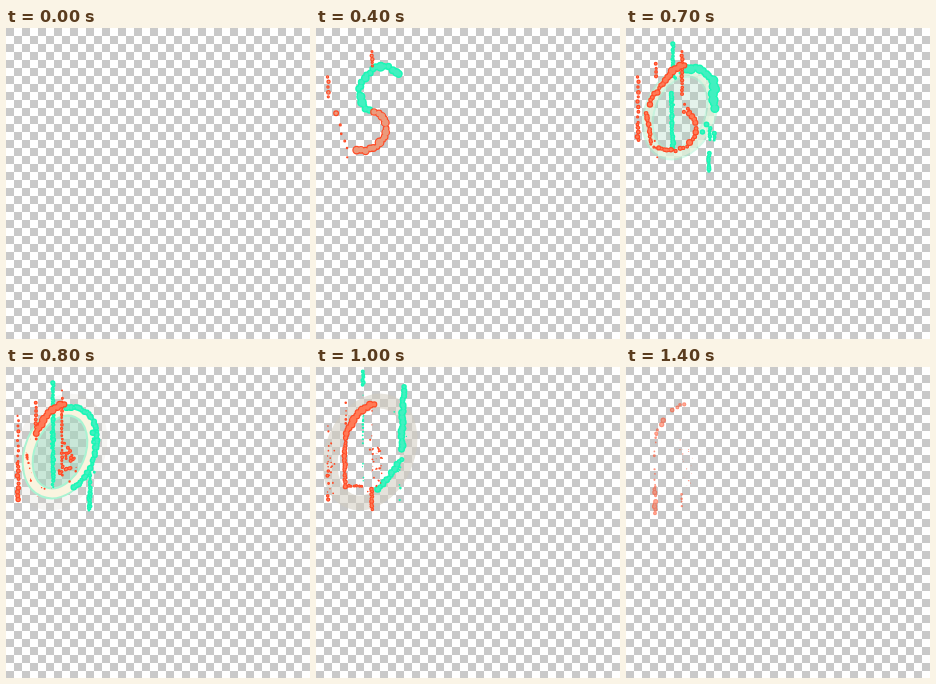
Animation of 304x311 px, one loop 1500 ms. Source, as an HTML page with a canvas:

```html
<!DOCTYPE html>
<html lang="en">
<head>
<meta charset="utf-8">
<title>Liquid ring</title>
<style>
html, body { margin: 0; width: 100%; height: 100%; overflow: hidden; }
body { background: repeating-conic-gradient(#fff 0 25%, #c9c9c9 0 50%) 0 0 / 16px 16px; }
canvas { position: absolute; left: 0; top: 0; }
</style>
</head>
<body>
<script>
const LOOP = 1500, STEP = 100;
const clamp = x => Math.max(0, Math.min(1, x));
const ramp = (t, a, b) => clamp((t - a) / (b - a));

let seed = 7;
const rand = () => {
  seed = (seed * 16807) % 2147483647;
  return seed / 2147483647;
};

function layer() {
  const c = document.createElement('canvas');
  c.width = 304;
  c.height = 311;
  document.body.append(c);
  return c.getContext('2d');
}
const ringLayer = layer(), tealLayer = layer(), redLayer = layer();
const red = [], teal = [];

// A chain of drops that grows along a path from..to and dries up during hold..end.
function drip(list, d, width, [from, to, hold, end], gap = width * .45, spread = width * .12) {
  const path = document.createElementNS('http://www.w3.org/2000/svg', 'path');
  path.setAttribute('d', d);
  const len = path.getTotalLength();
  const n = Math.max(1, Math.round(len / gap));
  for (let i = 0; i <= n; i++) {
    const p = path.getPointAtLength(len * i / n);
    list.push({
      x: p.x + (rand() - .5) * 2 * spread,
      y: p.y + (rand() - .5) * 2 * spread,
      r: width * (.36 + rand() * .2),
      born: from + (to - from) * i / n,
      hold,
      end: hold + (end - hold) * (.35 + .65 * rand())
    });
  }
}

// Opening swirl
drip(red, 'M59 83Q74 92 67 110Q60 124 41 122', 9, [100, 400, 600, 900]);
drip(red, 'M24 97L26 112L31 114V129', 3, [200, 400, 650, 850], 8);
drip(red, 'M12 49V109', 4.5, [300, 600, 700, 1100], 5);
drip(red, 'M56 24V66', 4, [300, 600, 700, 900], 3.6);
drip(teal, 'M53 83Q38 70 46 54Q56 36 72 39L83 46', 9, [100, 400, 500, 780]);

// Second turn
drip(red, 'M20 85Q24 102 24 112T46 122', 6, [400, 600, 650, 850]);
drip(red, 'M46 45Q32 58 24 76', 8, [450, 600, 650, 850]);
drip(teal, 'M60 41Q76 36 88 56V80', 10, [450, 600, 700, 900]);
drip(teal, 'M45 65L47 120', 5, [430, 600, 700, 900]);
drip(teal, 'M80 97L76 104', 8, [500, 580, 620, 820]);
drip(teal, 'M88 106V112', 6, [500, 580, 650, 850]);
drip(teal, 'M83 125V143', 4.5, [500, 600, 750, 1000]);

// Around the bright ring
drip(red, 'M12 96V133', 5, [620, 800, 850, 1250], 4);
drip(red, 'M58 37Q39 42 31 67', 8, [650, 800, 1050, 1750]);
drip(red, 'M30 36V72', 4, [650, 800, 850, 1150], 4);
drip(red, 'M56 40V108', 3.6, [680, 800, 820, 1050], 3.5);
drip(red, 'M59 78L64 94L57 106', 4, [680, 800, 820, 1100], 1.6, 4);
drip(teal, 'M60 40Q90 40 91 70Q90 105 68 120', 6, [650, 800, 820, 1020]);
drip(teal, 'M84 100V142', 4.5, [650, 800, 820, 1080], 3);
drip(teal, 'M47 16V114', 5, [650, 800, 820, 1050], 3);

// Last drips and specks
drip(red, 'M31 66Q28 74 29 120', 5, [820, 1000, 1020, 1550]);
drip(red, 'M29 122V146', 6, [1050, 1200, 1200, 1750], 3);
drip(red, 'M30 119H46', 4, [880, 1000, 1020, 1180], 2.5);
drip(red, 'M56 122V142', 5, [850, 1000, 1100, 1600], 2.5);
drip(red, 'M58 76L62 104L54 124', 2, [850, 1000, 1020, 1700], 2.2, 6);
drip(red, 'M16 74V124', 1.8, [850, 1000, 1000, 1250], 3.5, 4);
drip(teal, 'M88 20Q86 50 86 82', 7, [830, 1000, 1050, 1400], 3);
drip(teal, 'M85 92Q74 110 62 122', 7, [850, 1000, 1050, 1400]);
drip(teal, 'M47 5V18', 4.5, [850, 980, 1100, 1400], 2.5);
drip(teal, 'M47 50V76', 2.5, [850, 980, 1000, 1150], 4);

function drops(g, list, t, inset, color) {
  g.fillStyle = color;
  g.beginPath();
  for (const p of list) {
    if (t < p.born || t >= p.end) continue;
    const r = p.r * Math.sqrt(1 - ramp(t, p.hold, p.end)) - inset;
    if (r <= .2) continue;
    g.moveTo(p.x + r, p.y);
    g.arc(p.x, p.y, r, 0, 7);
  }
  g.fill();
}

function ellipse(g, rx, ry, color, line) {
  g.beginPath();
  g.ellipse(54, 85, rx, ry, .4, 0, 7);
  if (line) {
    g.lineWidth = line;
    g.strokeStyle = color;
    g.stroke();
  } else {
    g.fillStyle = color;
    g.fill();
  }
}

function ring(g, t) {
  const glow = ramp(t, 600, 800) * (1 - ramp(t, 800, 1000));
  const haze = ramp(t, 700, 1000) * (1 - ramp(t, 1000, 1200));
  g.globalAlpha = haze * .55;
  ellipse(g, 37, 53, '#cfcabd', 15);
  g.globalAlpha = glow;
  ellipse(g, 29, 42, 'rgba(165,215,190,.6)');
  ellipse(g, 30, 43, '#a9f3d2', 12);
  ellipse(g, 30, 43, '#faf4df', 8);
  g.globalAlpha = 1;
}

function paint(t) {
  for (const g of [ringLayer, tealLayer, redLayer]) g.clearRect(0, 0, 304, 311);
  ring(ringLayer, t);
  drops(tealLayer, teal, t, 0, '#19f7b5');
  drops(tealLayer, teal, t, 1.5, '#42f0c0');
  drops(redLayer, red, t, 0, '#ff4a25');
  drops(redLayer, red, t, 1.2, t < 700 ? '#eb9a7c' : '#ff7a56');
  tealLayer.canvas.style.opacity = 1 - .5 * ramp(t, 1100, 1400);
  redLayer.canvas.style.opacity = 1 - .4 * ramp(t, 1100, 1400);
}

const start = performance.now();
let shown = -1;
function tick() {
  const t = Math.floor((performance.now() - start) % LOOP / STEP) * STEP;
  if (t !== shown) paint(shown = t);
  requestAnimationFrame(tick);
}
tick();
</script>
</body>
</html>
```
